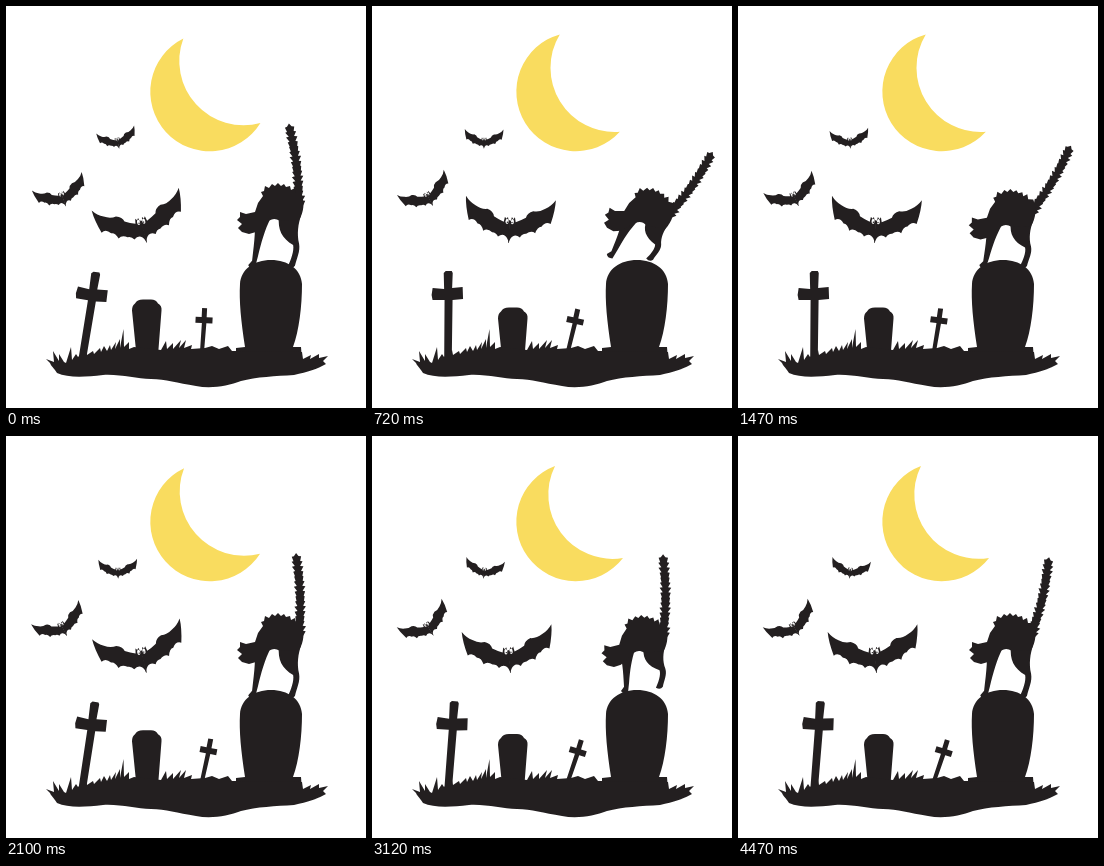
Recreate the animation shown at these times as an HTML page. Size 360x402 px, loop 4.5 s.

```html
<!DOCTYPE html>
<html lang="en">
<head>
<meta charset="utf-8">
<title>Graveyard cat</title>
<style>
html, body { margin: 0; width: 100%; height: 100%; overflow: hidden; background: #fff; }
svg { display: block; width: 100vw; height: 100vh; fill: #231f20; }
</style>
</head>
<body>
<svg viewBox="0 0 360 402">
  <defs>
    <path id="wing" d="M.3 -10 L-1 -9 -2 -13 -3.500 -11 -5 -13 -6 -8 Q-11 -10 -16 -13 Q-17 -18 -23 -20 Q-29 -19 -35 -23 Q-41 -26 -45 -32 Q-45 -22 -41 -8 Q-36 -11 -32 -5 Q-28 -5 -26 2 Q-22 -1 -17 3 Q-13 3 -11 7 Q-7 4 -4 6 Q-1 8 0 13 L.3 13Z"/>
    <g id="bat">
      <use href="#wing"/><use href="#wing" transform="scale(-1 1)"/>
      <g fill="#fff"><ellipse cx="-2.700" cy="-8.500" rx="1.500" ry="2.700"/><ellipse cx="2.700" cy="-8.500" rx="1.500" ry="2.700"/></g>
      <circle cx="-2.300" cy="-7.600" r=".7"/><circle cx="2.300" cy="-7.600" r=".7"/>
    </g>
  </defs>

  <path id="moon" fill="#f9dc5f" d="M183 30 A59.5 59.5 0 1 0 251 122 A64.3 64.3 0 0 1 183 30Z"/>

  <use id="bigBat" href="#bat"/>
  <use id="leftBat" href="#bat"/>
  <use id="topBat" href="#bat"/>

  <path id="cross" d="M-4 5 L-4 -61 -16 -61 -17 -66 -16 -73 -4.5 -72 -5 -88 -3 -90 3 -90 4 -88 3.500 -73 14 -74 14.500 -62 4 -61 3.500 5Z"/>
  <path id="smallCross" d="M-2 3 L-1.500 -28 -8 -28 -8 -34 -2 -34 -2 -43 3 -43 3 -34 9 -34 9 -28 3 -28 2 3Z"/>
  <path id="stone" d="M130.500 56 L126 11 Q126 6 129 4 Q131 0 137 0 L145 0 Q150 0 152 4 Q156 6 155.500 11 L152 56Z"/>

  <path d="M230 350 L230 342 239 341 C235 315 233 295 234 278 C235 263 248 254 265 254 C282 254 295 263 296 278 C296 300 293 325 287 341 L295 341 296 354Z"/>

  <path d="M40 353 L48 356 47 345 53 355 53 348 58 356 60 357 65 341 66 354 70 348 72 351 80 344 81 349 87 345 88 348 94 342 95 346 98 340 101 345 104 339 105 344 110 336 109 343 114 333 114 342 117.500 323 118 341 123 336 123 343 128 341 155 344 160 335 161 343 167 337 167 343 175 334 173 342 180 334 178 342 186 339 185 343 199 342 206 340 213 343 222 340 226 345 232 345 296 346 297 353 305 349 304 353 313 348 313 352 322 350 317 355 320 358 C311 363 302 366 288 369 C270 370 250 371 235 375 C222 380 205 383 190 380 C171 377 160 373 145 373 C130 373 115 368 97 369 C79 371 62 372 51 367 C48 362 45 360 44 357Z"/>

  <g id="cat">
    <path id="tail"/>
    <path id="rear" d="M-11 0 C-13 13 -9 22 2 29 C3 35 -1 44 -4 50 Q0 54 3 50 C5 42 9 36 8 28 C6 18 8 8 11 0Z"/>
    <path id="front" d="M-8 0 C-4 12 -3 25 -2 45 L-5 50 Q-3 54 2 52 L3 40 C4 25 5 14 9 0Z"/>
    <path id="body" d="M-20 26 L-27 28 -34 26 -38 22 -34 18 -39 14 -36 11 -36 6 -30 8 -21 6 -18 -3 -13 -10 -15 -14 -12 -15 -11 -20 -7 -18 -4 -22 -1 -20 2 -23 5 -20 8 -22 10 -19 14 -20 15 -16 19 -18 20 -13 25 -13 C29 -4 28 6 23 14 L4 15 C-2 11 -6 13 -12 19Z"/>
  </g>
</svg>
<script>
const LOOP = 4500, CYCLE = 2700;
const el = id => document.getElementById(id);
const move = (id, value) => el(id).setAttribute('transform', value);

// Eased swing between -1 and 1, at 1 when t equals peak
function swing(t, period, peak) {
  const c = Math.cos(2 * Math.PI * (t - peak) / period);
  return c * (1.2 - 0.2 * c * c);
}

// time, body x, y, turn, tail turn, front foot x, y, rear foot x, y
const poses = [
  [0, 0, 0, 0, -7, 247, 261, 286, 261],
  [420, -2, 2, -2, 0, 254, 256, 288, 252],
  [720, 4, 4, 13, 35, 239, 251, 278, 254],
  [1050, 6, -8, 18, 48, 232, 236, 266, 247],
  [1470, 0, 6, 1, 31, 246, 261, 286, 261],
  [1770, 0, 0, 0, 13, 247, 261, 286, 261],
  [2100, 0, 0, 0, -2, 247, 261, 286, 261],
  [2445, 0, 0, 0, -10, 247, 261, 286, 261]
];

function poseAt(i) {
  const n = poses.length, lap = Math.floor(i / n);
  const [t, ...rest] = poses[i - lap * n];
  return [t + lap * CYCLE, ...rest];
}

// Smooth cubic through the poses
function catPose(time) {
  const t = time % CYCLE;
  let i = poses.length - 1;
  while (poses[i][0] > t) i--;
  const [a, b, c, d] = [-1, 0, 1, 2].map(k => poseAt(i + k));
  const span = c[0] - b[0], s = (t - b[0]) / span, r = 1 - s;
  return b.slice(1).map((v, j) => {
    const k = j + 1;
    const m0 = (c[k] - a[k]) / (c[0] - a[0]) * span;
    const m1 = (d[k] - b[k]) / (d[0] - b[0]) * span;
    return v * (1 + 2 * s) * r * r + m0 * s * r * r + c[k] * s * s * (3 - 2 * s) - m1 * s * s * r;
  });
}

function tailPath() {
  const n = 32, left = [], right = [];
  for (let i = 0; i <= n; i++) {
    const y = -80 * i / n, mid = 2.5 * Math.sin(Math.PI * i / n);
    const fur = (i % 2 ? 2 : 0) + 0.6 * Math.sin(i * 2.4);
    const wide = (i < 4 ? 4.2 : 3.2) + fur - (i === n ? 1.5 : 0);
    left.push(`${mid - wide} ${y - (i % 2) * 2}`);
    right.unshift(`${mid + wide} ${y - (i % 2) * 2}`);
  }
  return `M0 6 L${left.join(' ')} 0 -83 ${right.join(' ')}Z`;
}

function drawCat(t) {
  const [dx, dy, turn, tail, fx, fy, rx, ry] = catPose(t);
  const x0 = 270 + dx, y0 = 200 + dy, a = turn * Math.PI / 180;
  const joint = (x, y) => [
    x0 + x * Math.cos(a) - y * Math.sin(a),
    y0 + x * Math.sin(a) + y * Math.cos(a)
  ];
  const leg = (id, [x, y], footX, footY) => {
    const vx = footX - x, vy = footY - y;
    const angle = Math.atan2(vy, vx) * 180 / Math.PI - 90;
    move(id, `translate(${x} ${y}) rotate(${angle}) scale(1 ${Math.hypot(vx, vy) / 51})`);
  };
  move('body', `translate(${x0} ${y0}) rotate(${turn})`);
  leg('front', joint(-14, 10), fx, fy);
  leg('rear', joint(14, 10), rx, ry);
  const [tx, ty] = joint(23, 0);
  move('tail', `translate(${tx} ${ty}) rotate(${tail}) scale(1 ${1 - 0.002 * Math.max(0, tail)})`);
}

function draw(t) {
  const slow = swing(t, CYCLE, 1095), fast = swing(t, CYCLE / 2, 465);
  move('moon', `rotate(${6.7 * slow} 204.5 86)`);
  move('cross', `translate(76.2 355) rotate(${4.3 - 5.5 * slow})`);
  move('stone', `translate(0 ${298 + 5 * slow})`);
  move('smallCross', `translate(196 345) rotate(${8.5 + 9 * fast})`);
  move('bigBat', `translate(137.3 224) rotate(${-5 + 11 * slow})`);
  move('leftBat', `translate(57.3 193) rotate(${-25 - 7.5 * fast}) scale(.59)`);
  move('topBat', `translate(112 137) rotate(${-4.5 + 11.7 * fast}) scale(.43)`);
  drawCat(t);
}

el('tail').setAttribute('d', tailPath());
const start = performance.now();
function tick() {
  draw((performance.now() - start) % LOOP);
  requestAnimationFrame(tick);
}
tick();
</script>
</body>
</html>
```
